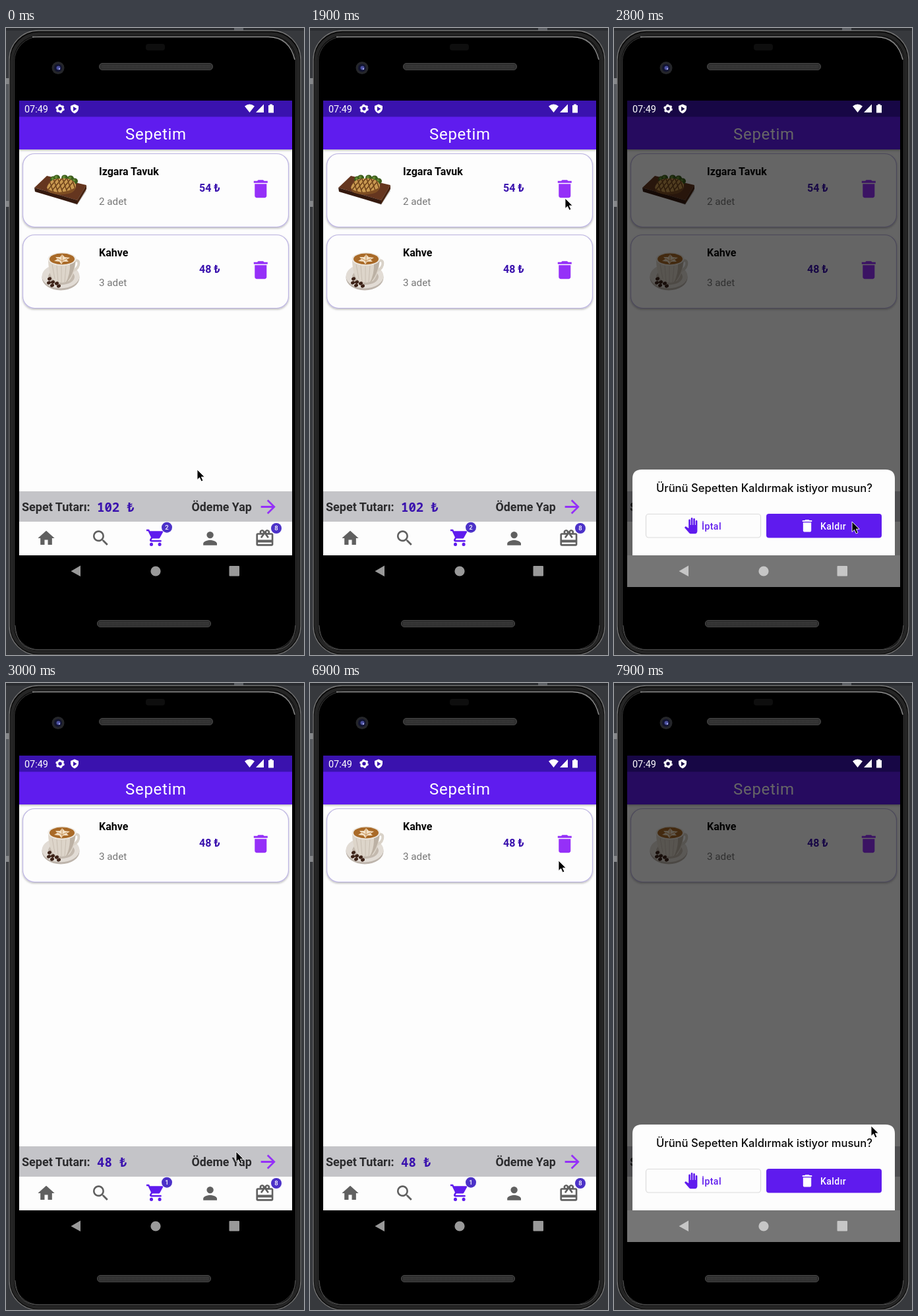
An HTML page for the animation above (8 s loop, 452 by 950 pixels).

```html
<!DOCTYPE html>
<html lang="tr">
<head>
<meta charset="utf-8">
<title>Sepetim</title>
<style>
  html, body { margin: 0; width: 100%; height: 100%; overflow: hidden; background: #37393d; }
  svg { display: block; width: 452px; height: 950px; font-family: Roboto, "Noto Sans", sans-serif; }
  .b { font-weight: 700; }
  .m { font-weight: 500; }
  .mono { font: 600 19px "Noto Sans Mono", "DejaVu Sans Mono", monospace; }
</style>
</head>
<body>
<svg id="stage" viewBox="0 0 452 950" xmlns="http://www.w3.org/2000/svg"></svg>
<script>
const VIOLET = '#5f1bee', DEEP = '#3a12ae', BRIGHT = '#9530f8', PAPER = '#fdfdfd';

const icons = {
  home: 'M10 20v-6h4v6h5v-8h3L12 3 2 12h3v8z',
  search: 'M15.5 14h-.79l-.28-.27C15.41 12.59 16 11.11 16 9.5 16 5.91 13.09 3 9.5 3S3 5.91 3 9.5 5.91 16 9.5 16c1.61 0 3.09-.59 4.23-1.57l.27.28v.79l5 4.99L20.49 19zm-6 0C7.01 14 5 11.99 5 9.5S7.01 5 9.5 5 14 7.01 14 9.5 11.99 14 9.5 14z',
  cart: 'M7 18a2 2 0 1 0 0 4 2 2 0 0 0 0-4zM1 2v2h2l3.6 7.59-1.35 2.45c-.16.28-.25.61-.25.96 0 1.1.9 2 2 2h12v-2H7.42c-.14 0-.25-.11-.25-.25l.03-.12.9-1.63h7.45c.75 0 1.41-.41 1.75-1.03l3.58-6.49A1 1 0 0 0 20 4H5.21l-.94-2zM17 18a2 2 0 1 0 0 4 2 2 0 0 0 0-4z',
  person: 'M12 12a4 4 0 1 0 0-8 4 4 0 0 0 0 8zm0 2c-2.67 0-8 1.34-8 4v2h16v-2c0-2.66-5.33-4-8-4z',
  gift: 'M20 6h-2.18A3 3 0 0 0 12.5 3.35l-.5.67-.5-.68A3 3 0 0 0 6.18 6H4a2 2 0 0 0-2 2v11a2 2 0 0 0 2 2h16a2 2 0 0 0 2-2V8a2 2 0 0 0-2-2zm-5-2a1 1 0 1 1 0 2 1 1 0 0 1 0-2zM9 4a1 1 0 1 1 0 2 1 1 0 0 1 0-2zm11 15H4v-2h16zm0-5H4V8h5.08L7 10.83 8.62 12 12 7.4 15.38 12 17 10.83 14.92 8H20z',
  bin: 'M6 19c0 1.1.9 2 2 2h8c1.1 0 2-.9 2-2V7H6zM19 4h-3.5l-1-1h-5l-1 1H5v2h14z',
  arrow: 'M12 4l-1.41 1.41L16.17 11H4v2h12.17l-5.58 5.59L12 20l8-8z',
  hand: 'M23 5.5V20c0 2.2-1.8 4-4 4h-7.3c-1.08 0-2.1-.43-2.85-1.19L1 14.83s1.26-1.23 1.3-1.25c.22-.19.49-.29.79-.29.22 0 .42.06.6.16L8 15.91V4a1.5 1.5 0 0 1 3 0v7h1V1.5a1.5 1.5 0 0 1 3 0V11h1V2.5a1.5 1.5 0 0 1 3 0V11h1V5.5a1.5 1.5 0 0 1 3 0z'
};

const icon = (name, x, y, s, fill, sy = s) =>
  `<path d="${icons[name]}" fill="${fill}" fill-rule="evenodd" transform="translate(${x} ${y}) scale(${s} ${sy}) translate(-12 -12)"/>`;
const text = (s, x, y, size, fill, more = '') =>
  `<text x="${x}" y="${y}" font-size="${size}" fill="${fill}" ${more}>${s}</text>`;
const rect = (x, y, w, h, fill, more = '') =>
  `<rect x="${x}" y="${y}" width="${w}" height="${h}" fill="${fill}" ${more}/>`;
const oval = (x, y, rx, ry, fill, more = '') =>
  `<ellipse cx="${x}" cy="${y}" rx="${rx}" ry="${ry}" fill="${fill}" ${more}/>`;
const path = (d, fill, more = '') => `<path d="${d}" fill="${fill}" ${more}/>`;

function shell() {
  const speaker = (x, y) => rect(x, y, 172, 10, '#2e2e2e', 'rx="4.5" stroke="#484848"')
    + rect(x + 3, y + 2, 166, 6, 'url(#mesh)');
  return rect(0, 0, 452, 950, '#37393d')
    + rect(0, 0, 452, 4, '#2a2c30')
    + rect(0, 85, 5, 180, '#55585d') + rect(0, 76, 5, 9, '#85878a') + rect(0, 262, 5, 9, '#85878a')
    + rect(346, 0, 14, 6, '#606368')
    + rect(5, 4, 442, 946, '#090909', 'rx="44" stroke="#747474" stroke-width="1.3"')
    + rect(9, 9, 434, 937, 'none', 'rx="41" stroke="#252525" stroke-width="5"')
    + rect(12.5, 13, 427, 929, '#000', 'rx="38" stroke="#3b3b3b"')
    + path('M40 13.5H398Q430 14 438 48', 'none', 'stroke="#8d8d8d" stroke-width="1.4"')
    + path('M14 905Q16 940 46 942H408Q437 940 439 905', 'none', 'stroke="#555"')
    + rect(212, 24, 29, 10, '#0e0e0e', 'rx="4"')
    + speaker(141.5, 53.5) + speaker(138.5, 897.5)
    + oval(79, 60.5, 9.5, 9.5, '#25262a') + oval(79, 60.5, 6, 6, '#121430')
    + oval(79.5, 60.5, 3, 3, '#4b50a0') + oval(81, 62, 1.2, 1.2, '#a9acec');
}

function grill() {
  let bars = '';
  for (let i = 0; i < 6; i++) {
    const x = 64 + i * 7;
    bars += `M${x} 226l9 26M${x + 10} 224l-18 22`;
  }
  const greens = [[72, 229], [77, 227], [89, 227], [98, 228], [104, 232], [101, 236]];
  return path('M46 246L108 268 122 247 119 241z', '#999', 'opacity=".55"')
    + path('M43 242L62 224 122 238 108 261z', '#65361f')
    + path('M43 242L108 261V267L44 248z', '#35190e') + path('M108 261L122 238V244L108 267z', '#48230f')
    + greens.map(([x, y]) => oval(x, y, 5, 4.5, '#3c5d1c') + oval(x - 1, y - 1, 2.2, 2, '#658b33')).join('')
    + path('M62 242Q66 228 81 228 101 226 106 237 107 247 95 250 79 253 66 249z', '#c99951')
    + path(bars, 'none', 'stroke="#6d4119" stroke-width="1.5" clip-path="url(#meat)"')
    + path('M62 243Q80 255 105 242 104 249 95 251 77 255 64 248z', '#7e4d22');
}

function coffee() {
  const beans = [[66, 380], [71, 385], [77, 387], [70, 390], [80, 391], [65, 386]];
  return oval(83, 378, 28.5, 19.5, '#bdb4ab') + oval(83, 376, 28.5, 18.5, '#e2dcd5')
    + oval(84, 377, 20, 12, '#c3b9ae')
    + path('M101 354Q112 349 110 359 108 367 99 368', 'none', 'stroke="#d9d2c8" stroke-width="4"')
    + path('M64 349Q64 373 73 383 84 389 96 383 105 372 106 349z', '#ddd5ca')
    + path('M90 387Q103 376 106 349L97 354Q98 374 90 387z', '#bcb1a4')
    + path('M70 358l4 22M77 360l2 25M84 361v25M91 360l-2 25', 'none', 'stroke="#c8beb2"')
    + oval(85, 350, 21.5, 10, '#eee9e2') + oval(85, 350, 19, 8.4, '#a96a28')
    + path('M85 343L89 347 97 348 92 351 95 354 87 354 84 358 81 354 73 353 78 350 75 347 82 347z', '#f2dfc4')
    + path('M85 344V356M78 349l7 4 8-4', 'none', 'stroke="#c18849" stroke-width=".9"')
    + beans.map(([x, y]) => oval(x, y, 3.1, 2.4, '#3d2318', `transform="rotate(-25 ${x} ${y})"`)).join('');
}

// Cards are drawn at the first slot; art is placed by the caller.
function card(id, name, count, price, art, shift) {
  return `<g id="${id}">`
    + rect(25.5, 190.5, 403, 111, PAPER, 'rx="18" stroke="#bdb5e3" stroke-width="1.2" filter="url(#drop)"')
    + `<g transform="translate(0 ${shift})">${art}</g>`
    + text(name, 141, 223, 16, '#050505', 'class="b"')
    + text(count, 141, 268, 15.2, '#777')
    + text(price, 293, 248, 16, DEEP, 'class="b"')
    + icon('bin', 386.3, 243.7, 1.5, BRIGHT) + '</g>';
}

const badge = (id, n, x, y) => oval(x, y, 8, 8, '#4c32c8')
  + text(n, x, y + 3.4, 9.5, '#fff', `id="${id}" class="m" text-anchor="middle"`);

function page() {
  const grey = '#606060';
  return rect(20, 110, 414, 689, PAPER) + rect(20, 134, 414, 50, VIOLET, 'filter="url(#drop)"')
    + rect(20, 110, 414, 24.5, DEEP)
    + text('Sepetim', 181, 169, 24, '#fff', 'letter-spacing=".7"')
    + card('meal', 'Izgara Tavuk', '2 adet', '54 ₺', grill(), 0)
    + card('drink', 'Kahve', '3 adet', '48 ₺', coffee(), -123)
    + rect(20, 702, 414, 46, '#c4c4c8') + rect(20, 748, 414, 51, PAPER)
    + text('Sepet Tutarı:', 24, 732, 18, '#2b2b2d', 'class="b"')
    + text('', 138, 733, 19, DEEP, 'id="total" class="mono" xml:space="preserve"')
    + text('Ödeme Yap', 281.5, 732, 17.8, '#2b2b2d', 'class="b"')
    + icon('arrow', 397.7, 725.5, 1.38, BRIGHT)
    + icon('home', 61, 773, 1.26, grey) + icon('search', 143.7, 773, 1.3, grey)
    + icon('cart', 226.8, 772.3, 1.26, VIOLET) + icon('person', 309.6, 773.3, 1.3, grey)
    + icon('gift', 392.4, 773, 1.3, grey)
    + badge('amount', '2', 244, 756.7) + badge('gifts', '8', 410, 758);
}

const status = () => text('07:49', 28, 128, 14.4, '#fff')
  + oval(82, 122.3, 4.2, 4.2, 'none', 'stroke="#fff" stroke-width="3"')
  + oval(82, 122.3, 5.9, 5.9, 'none', 'stroke="#fff" stroke-width="1.8" stroke-dasharray="3 3.18"')
  + path('M104 115.5l6 2.5v4.5q-1 5-6 7-5-2-6-7V118zM102 119v7l5.5-3.5z', '#fff', 'fill-rule="evenodd"')
  + path('M362 118.5q7.500-6 15 0l-7.500 9.500zM379 128h12V115.500z', '#fff')
  + path('M398 117h2v-1.500h4V117h2v11.500h-8z', '#fff');

const sheet = () => path('M28 810V683Q28 669 42 669H412Q426 669 426 683V810z', PAPER)
  + text('Ürünü Sepetten Kaldırmak istiyor musun?', 228, 703, 16.6, '#080808',
    'class="m" text-anchor="middle" style="font-family:Inter,\'Open Sans\',sans-serif"')
  + rect(48.5, 736.5, 174, 35.5, PAPER, 'rx="4" stroke="#dcdcdc" stroke-width="1.2"')
  + rect(231, 736, 175, 36.5, VIOLET, 'rx="4"')
  + icon('hand', 116.7, 754, .88, VIOLET, 1.02)
  + text('İptal', 133, 760, 14, VIOLET, 'class="m" letter-spacing=".45"')
  + icon('bin', 293, 754.3, 1.03, '#fff')
  + text('Kaldır', 313, 760, 14, '#fff', 'class="m" letter-spacing=".45"');

const stage = document.getElementById('stage');
stage.innerHTML = `<defs>
  <filter id="drop" x="-5%" y="-10%" width="110%" height="125%"><feDropShadow dx="0" dy="1.5" stdDeviation="1.5" flood-opacity=".28"/></filter>
  <pattern id="mesh" width="2" height="2" patternUnits="userSpaceOnUse"><rect width="1" height="1" fill="#5b5b5b"/><rect x="1" y="1" width="1" height="1" fill="#171717"/></pattern>
  <clipPath id="meat"><path d="M62 242Q66 228 81 228 101 226 106 237 107 247 95 250 79 253 66 249z"/></clipPath>
  <clipPath id="view"><rect x="20" y="110" width="414" height="689"/></clipPath></defs>`
  + shell()
  + `<g clip-path="url(#view)">${page()}</g>`
  + `<g id="scrim">${rect(20, 110, 414, 689, '#000', 'opacity=".6"')}${rect(20, 799, 414, 48, '#757575')}</g>`
  + status()
  + `<g id="keys">${path('M98.500 823L113 814.500V831z', 'inherit')}${oval(227, 823, 7.6, 7.6, 'inherit')}${rect(338.500, 815, 15.500, 15.500, 'inherit', 'rx="1"')}</g>`
  + `<g clip-path="url(#view)"><g id="sheet">${sheet()}</g></g>`
  + path('M0 0V15.500L3.600 12.200 6.200 18 8.900 16.800 6.400 11.200H11.200z', '#000', 'id="cursor" stroke="#fff" stroke-width=".9"');

const $ = id => document.getElementById(id);

// [time, x, y]
const cursorSteps = [
  [0, 290, 669], [600, 290, 669], [1700, 387, 260], [1900, 387, 258], [2200, 387, 258],
  [2700, 361, 748], [2800, 361, 748], [3000, 349, 710], [3300, 348, 640], [4700, 348, 637],
  [5600, 348, 637], [6500, 377, 280], [6900, 377, 269], [7100, 384, 250], [7400, 384, 250], [7900, 390, 671]
];
// [time, openness]
const sheetSteps = [
  [0, 0], [2100, 0], [2200, .6], [2300, 1], [2800, 1], [2900, .4], [3000, 0],
  [7300, 0], [7400, .6], [7500, 1], [7900, 1]
];

function at(steps, t) {
  let i = steps.findIndex(s => s[0] > t);
  if (i < 0) return steps[steps.length - 1].slice(1);
  const a = steps[i - 1], b = steps[i];
  const k = (t - a[0]) / (b[0] - a[0]), e = k * k * (3 - 2 * k);
  return a.slice(1).map((v, j) => v + (b[j + 1] - v) * e);
}

function draw(t) {
  const removed = t >= 3000;
  const [x, y] = at(cursorSteps, t), [open] = at(sheetSteps, t);
  $('meal').style.display = removed ? 'none' : '';
  $('drink').setAttribute('transform', `translate(0 ${removed ? 0 : 123})`);
  $('total').textContent = removed ? '48 ₺' : '102 ₺';
  $('amount').textContent = removed ? '1' : '2';
  $('scrim').setAttribute('opacity', open);
  $('keys').setAttribute('fill', open > .5 ? '#c6c6c6' : '#999');
  $('sheet').setAttribute('transform', `translate(0 ${(1 - open) * 135})`);
  $('cursor').setAttribute('transform', `translate(${x} ${y})`);
}

const start = performance.now();
function tick() {
  const t = (performance.now() - start) % 8000;
  draw(Math.floor(t / 100) * 100);
  requestAnimationFrame(tick);
}
tick();
</script>
</body>
</html>
```
